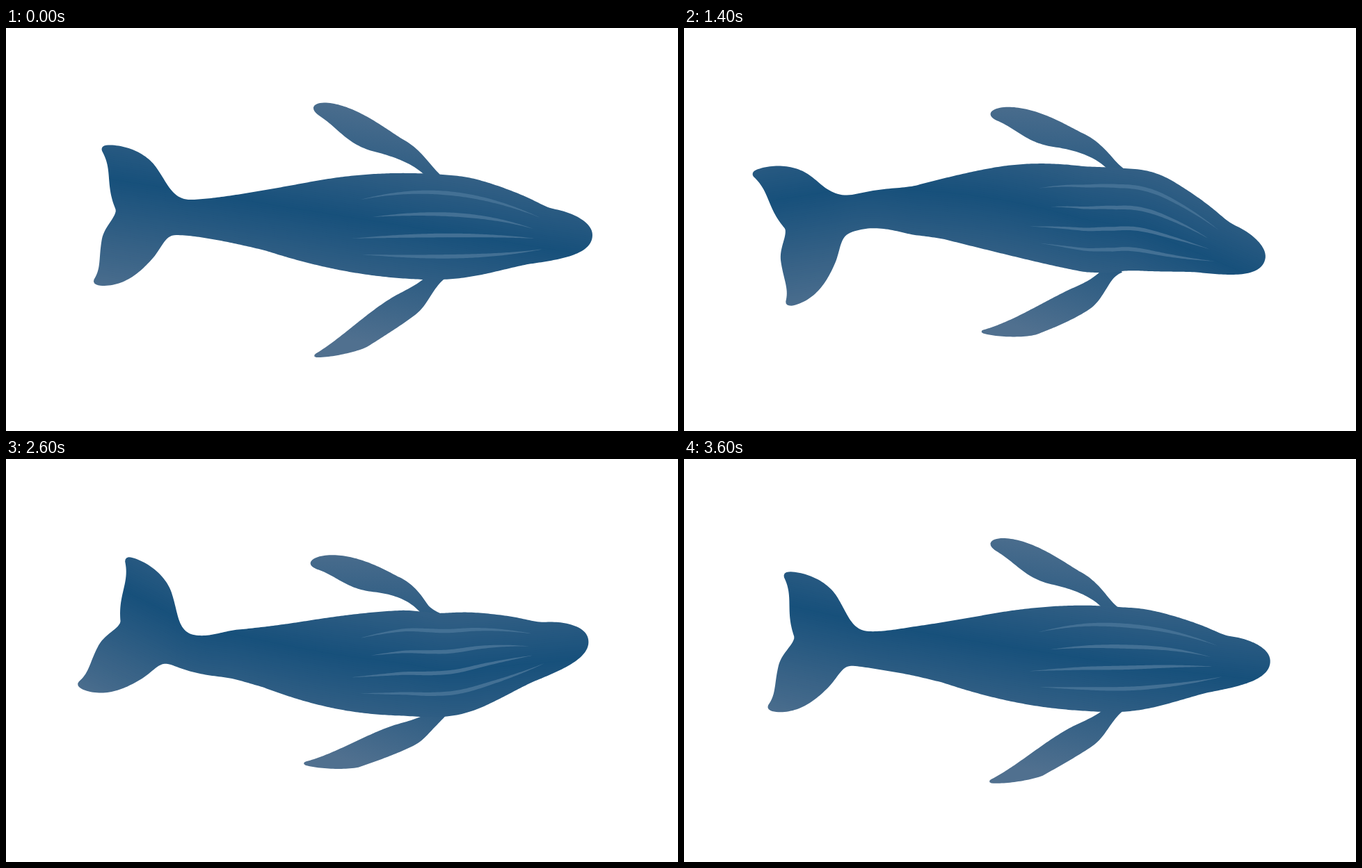
Animation, 966 px wide and 580 px high, one loop 3700 ms. Source, as an HTML page with a canvas:

```html
<!DOCTYPE html>
<html lang="en">
<head>
<meta charset="utf-8">
<title>Whale</title>
<style>
  html, body { margin: 0; width: 100%; height: 100%; overflow: hidden; background: #fff; }
  canvas { display: block; }
</style>
</head>
<body>
<canvas id="stage" width="966" height="580"></canvas>
<script>
const ctx = document.getElementById('stage').getContext('2d');
const LOOP = 3700, STEP = 100, REACH = 175;
const LIGHT = [80, 112, 143], DARK = [23, 80, 123];

const rad = deg => deg * Math.PI / 180;
const mix = (a, b, k) => a + (b - a) * k;
const rgb = c => `rgb(${c.map(Math.round).join()})`;

// Smooth step from 0 at a to 1 at b
function ramp(a, b, v) {
  const k = Math.min(1, Math.max(0, (v - a) / (b - a)));
  return k * k * (3 - 2 * k);
}

// Linear rise and fall between two times
function swing(t, from, peak, to) {
  return Math.max(0, Math.min((t - from) / (peak - from), (to - t) / (to - peak)));
}

function turn([x, y], [px, py], angle, scale = 1) {
  const c = Math.cos(angle) * scale, s = Math.sin(angle) * scale, dx = x - px, dy = y - py;
  return [px + dx * c - dy * s, py + dx * s + dy * c];
}

// Points along a path, close enough together to be bent
function sample(d, gap = 3) {
  const path = document.createElementNS('http://www.w3.org/2000/svg', 'path');
  path.setAttribute('d', d);
  const length = path.getTotalLength(), n = Math.ceil(length / gap);
  return Array.from({ length: n + 1 }, (_, i) => {
    const { x, y } = path.getPointAtLength(length * i / n);
    return [x, y];
  });
}

// Closed shape around a line of points, half(k) thick on each side
function ribbon(line, half) {
  const side = sign => line.map(([x, y], i) => [x, y + sign * half(i / (line.length - 1))]);
  return side(-1).concat(side(1).reverse());
}

const body = sample(`M843,298 C843,280 816,266 790,261 C770,257 765,248 715,230
  S650,213 627,211 C560,206 500,210 440,221 S300,247 265,247
  C238,247 232,222 214,198 C200,180 174,169 150,168.5 C140,168 136,171 138,177
  C154,205 142,225 158,262 C157,274 142,285 138,303 C133,330 137,345 127,361
  C124,366 127,371 140,371 C172,371 195,350 213,329 C228,309 230,297 247,298
  C280,299 330,310 372,320 C440,342 510,358 590,361.5 C660,366 700,350 750,340
  C790,334 843,328 843,298Z`);

const topFin = {
  pivot: [612, 205],
  points: sample(`M630,216 C612,203 600,176 570,160 C547,146 502,110 460,107.5
    C442,107 435,115 450,126 C478,144 490,168 530,178 C565,187 590,198 606,216 L612,228Z`)
};
const lowFin = {
  pivot: [616, 362],
  points: sample(`M634,358 C612,374 608,398 588,413 C570,427 530,452 519,459
    C500,468 460,475 446,474 C441,473 442,470 448,467 C485,444 520,408 560,385
    C575,377 592,369 604,358 L616,345Z`)
};

const stripes = [
  'M510,247 C590,229 670,231 768,273',
  'M527,272 C600,265 680,264 758,289',
  'M497,303 C585,298 675,296 762,303',
  'M512,326 C595,330 690,332 773,318'
].map(d => ribbon(sample(d), k => 2.8 * Math.sin(Math.PI * k)));

// Shading: nested bands around a dark midline, so that it bends with the body
const midline = sample('M60,203 L900,337', 15);
const bands = [];
for (let d = REACH; d > 0; d -= 3) {
  bands.push({
    shape: ribbon(midline, () => d),
    color: rgb(DARK.map((v, i) => mix(v, LIGHT[i], d / REACH)))
  });
}
const shade = ctx.createLinearGradient(463, 90, 407, 436);
[LIGHT, DARK, LIGHT].forEach((c, i) => shade.addColorStop(i / 2, rgb(c)));

// Bend of the whole body: tail and head turn, the back arches between them
function makeBend(down, up) {
  const tailAngle = rad(28 * up - 27 * down);
  const headAngle = rad(21 * down - 22.5 * up);
  const shift = 11 * up - 6 * down, arch = 9 * up - 24 * down;
  return p => {
    const [x, y] = p;
    const tw = 1 - ramp(225, 335, x), hw = ramp(570, 690, x);
    const tail = turn(p, [250, 270], tailAngle);
    const head = turn(p, [650, 290], headAngle);
    const k = Math.min(1, Math.max(0, (x - 230) / 390));
    return [
      x + tw * (tail[0] - x - 22 * down) + hw * (head[0] - x) - 4 * up * (1 - tw),
      y + tw * (tail[1] - y - 3 * down) + hw * (head[1] - y - 11 * down)
        + shift * ramp(230, 520, x) + arch * Math.sin(Math.PI * k)
    ];
  };
}

function trace(points, map) {
  ctx.beginPath();
  for (const p of points) ctx.lineTo(...map(p));
  ctx.closePath();
}

// A fin curls towards its tip; its root follows the body
function drawFin({ points, pivot }, bend, fold, lift, shrink) {
  const root = bend(pivot).map((v, i) => v - pivot[i]);
  trace(points, p => {
    const far = Math.hypot(p[0] - pivot[0], p[1] - pivot[1]);
    const angle = fold * Math.sqrt(far / 200), follow = Math.exp(-far / 60);
    return turn(p, pivot, rad(angle), 1 - shrink * Math.abs(angle))
      .map((v, i) => v + mix(lift[i], root[i], follow));
  });
  // The shading turns with the fin
  ctx.save();
  ctx.translate(pivot[0] + lift[0], pivot[1] + lift[1]);
  ctx.rotate(rad(fold * 0.8));
  ctx.translate(-pivot[0], -pivot[1]);
  ctx.fillStyle = shade;
  ctx.fill();
  ctx.restore();
}

function draw(t) {
  const down = swing(t, 0, 1050, 2100), up = swing(t, 2100, 2900, LOOP);
  const bend = makeBend(down, up);

  ctx.globalCompositeOperation = 'source-over';
  ctx.fillStyle = rgb(LIGHT);
  ctx.fillRect(0, 0, 966, 580);
  for (const { shape, color } of bands) {
    trace(shape, bend);
    ctx.fillStyle = color;
    ctx.fill();
  }
  ctx.globalCompositeOperation = 'destination-in';
  trace(body, bend);
  ctx.fill();

  ctx.globalCompositeOperation = 'source-over';
  ctx.fillStyle = '#437094';
  for (const s of stripes) {
    trace(s, bend);
    ctx.fill();
  }

  // The fins lie behind the body; the top one flaps twice while the back arches
  ctx.globalCompositeOperation = 'destination-over';
  const flap = 1 - Math.abs(2 * down - 1);
  const topFold = 17 * up + 5.8 * down + 5.5 * flap;
  const lowFold = 15.8 * down + 12.5 * Math.sin(up * Math.PI / 2);
  drawFin(topFin, bend, -topFold, [3 * down, -24 * down], 0.005);
  drawFin(lowFin, bend, lowFold, [0, 0], 0.001);
}

const start = performance.now();
let last = -1;
function tick() {
  const t = Math.floor((performance.now() - start) % LOOP / STEP) * STEP;
  if (t !== last) draw(last = t);
  requestAnimationFrame(tick);
}
tick();
</script>
</body>
</html>
```
